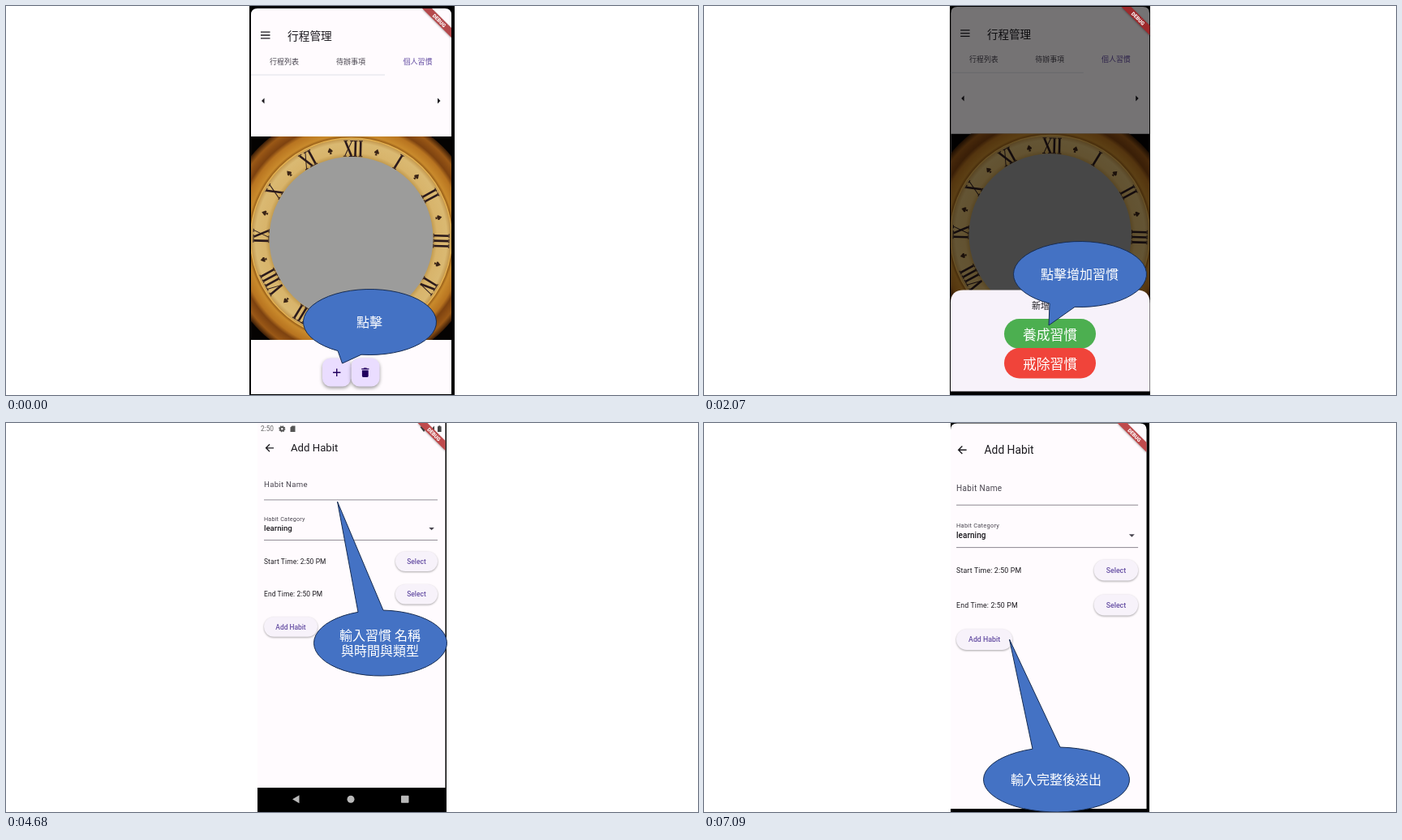
Write an HTML page that moves like this. It is 853 px wide and 480 px high and loops after 8 s.

```html
<!DOCTYPE html>
<html lang="zh-Hant">
<head>
<meta charset="utf-8">
<title>Habit tutorial</title>
<style>
  html, body { margin: 0; width: 100%; height: 100%; overflow: hidden; background: #fff; }
  svg { display: block; width: 853px; height: 480px; }
  text { font-family: Roboto, "Noto Sans CJK TC", "Noto Sans CJK", sans-serif; white-space: pre; }
  .soft { filter: drop-shadow(0 1px 1px #0005); }
  .fab { filter: drop-shadow(0 2px 2px #0006); }
</style>
</head>
<body>
<svg id="stage" viewBox="0 0 853 480"></svg>
<script>
const INK = '#1d1b20', GREY = '#49454f', PURPLE = '#6750a4', PAPER = '#fffbfe', DEEP = '#21005d';

const rect = (x, y, w, h, fill, r = 0, more = '') =>
  `<rect x="${x}" y="${y}" width="${w}" height="${h}" rx="${r}" fill="${fill}" ${more}/>`;
const path = (d, fill, stroke = 'none', width = 1) =>
  `<path d="${d}" fill="${fill}" stroke="${stroke}" stroke-width="${width}"/>`;
const circle = (x, y, r, fill, more = '') => `<circle cx="${x}" cy="${y}" r="${r}" fill="${fill}" ${more}/>`;
const text = (x, y, size, str, fill = INK, more = '') =>
  `<text x="${x}" y="${y}" font-size="${size}" fill="${fill}" ${more}>${str}</text>`;
const MID = 'text-anchor="middle"';
const label = (x, y, size, str, fill, weight = 400) => text(x, y, size, str, fill, `${MID} font-weight="${weight}"`);

// Area with rounded top corners
const topRounded = (x, y, w, h, r, fill) =>
  path(`M${x} ${y + h}V${y + r}q0 ${-r} ${r} ${-r}h${w - 2 * r}q${r} 0 ${r} ${r}V${y + h}Z`, fill);

// Corner ribbon: a and b are the distances of its two edges along the sides
function ribbon(right, top, a, b, fill) {
  const c = (a + b) / 4;
  return `<g class="soft">${path(`M${right - a} ${top}H${right - b}L${right} ${top + b}V${top + a}Z`, fill)}</g>` +
    `<g transform="translate(${right - c} ${top + c}) rotate(45)">${label(0, 2.2, 6.3, 'DEBUG', '#fff', 900)}</g>`;
}

// Elliptical callout whose tail leaves between x1 and x2 and ends at the tip
function bubble(cx, cy, rx, ry, x1, x2, tipX, tipY, lines) {
  const below = tipY > cy;
  const edge = x => cy + (below ? 1 : -1) * ry * Math.sqrt(1 - ((x - cx) / rx) ** 2);
  const d = `M${x1} ${edge(x1)}A${rx} ${ry} 0 1 ${+below} ${x2} ${edge(x2)}L${tipX} ${tipY}Z`;
  return path(d, '#4472c4', '#172c51') + lines.map((line, i) =>
    label(cx - .5, cy + 6 + (i - (lines.length - 1) / 2) * 19, 16, line, '#fff')).join('');
}

// Roman numeral built from thick and thin strokes, centred on the origin
const GLYPHS = {
  I: { w: 6.4, thick: 'M0-9V9', thin: 'M-2.5-9.5h5M-2.5 9.5h5' },
  V: { w: 11, thick: 'M-3.5-9L0 9', thin: 'M0 9L4-9M-6-9.5h5M2-9.5h4' },
  X: { w: 11, thick: 'M-4-9L4 9', thin: 'M4-9L-4 9M-6-9.5h5M2-9.5h4M-6 9.5h4M1 9.5h5' }
};
function numeral(str) {
  const glyphs = [...str].map(c => GLYPHS[c]);
  let x = -glyphs.reduce((sum, g) => sum + g.w, 0) / 2;
  return glyphs.map(g => {
    x += g.w;
    return `<g transform="translate(${x - g.w / 2} 0)">` +
      path(g.thick, 'none', '#2b1a1c', 2.6) + path(g.thin, 'none', '#2b1a1c', 1) + '</g>';
  }).join('');
}

function clock() {
  const marks = 'XII I II III IV V VI VII VIII IX X XI'.split(' ').map((n, i) =>
    `<g transform="rotate(${i * 30 + 1.5}) translate(0 -111)">${numeral(n)}</g>` +
    `<g transform="rotate(${i * 30 + 16.5}) translate(0 -111)">${path('M0-4L3 0Q3 3 0 1Q-3 3-3 0ZM-1.5 4L0 0L1.5 4Z', '#3a2416')}</g>`).join('');
  return `<svg x="302" y="161" width="247" height="251" viewBox="302 161 247 251">` + rect(302, 161, 247, 251, '#050302') +
    `<g transform="translate(425.5 287)">` + circle(0, 0, 160, 'url(#bezel)') +
    circle(0, 0, 124, 'url(#dial)', 'stroke="#e3b050" stroke-width="1.5"') + marks +
    circle(0, 0, 101, '#9c9c9b') + '</g></svg>';
}

const home =
  topRounded(302, 3, 247, 476, 8, PAPER) +
  path('M314 32.2h11.5M314 36h11.5M314 39.8h11.5', 'none', INK, 1.3) +
  text(347, 42, 13.7, '行程管理') +
  label(343, 71.5, 9, '行程列表', GREY) + label(425, 71.5, 9, '待辦事項', GREY) + label(507.5, 71.5, 9, '個人習慣', PURPLE) +
  rect(302, 84.5, 165, 1, '#dfe2ea') +
  path('M318.5 113.5v7l-3.5-3.5ZM532 113.5v7l3.5-3.5Z', INK) +
  clock() +
  [390, 425.5].map(x => rect(x, 434.5, 35, 35, '#eaddff', 10, 'class="fab"')).join('') +
  path('M403 452.3h9.4M407.7 447.6v9.4', 'none', DEEP, 1.4) +
  path('M438.2 447.2h2.4l.7-.8h3l.7.8h2.4v1.4h-9.2ZM438.9 449.4h7.8v7.2q0 1.3-1.3 1.3h-5.2q-1.3 0-1.3-1.3Z', DEEP);

const pill = (x, y, w, str) => rect(x, y, w, 24.5, '#f7f2fa', 12.2, 'class="soft"') +
  label(x + w / 2, y + 15.3, 8.4, str, PURPLE, 500);

const form =
  path('M330 30.8h-9M325 26.3l-4.5 4.5 4.5 4.5', 'none', INK, 1.3) +
  text(351, 35.2, 13.2, 'Add Habit') +
  text(318, 79, 9.6, 'Habit Name', GREY, 'letter-spacing=".3"') +
  rect(318, 94.5, 214, .8, '#79747e') +
  text(318, 121.4, 7.2, 'Habit Category', GREY, 'letter-spacing=".2"') +
  text(318, 133.4, 9.6, 'learning', INK, 'font-weight="500"') +
  path('M521.3 129h6.6l-3.3 3.3Z', GREY) +
  rect(318, 144, 214, .8, '#79747e') +
  text(318, 174, 8.4, 'Start Time: 2:50 PM', INK, 'letter-spacing=".15"') + pill(480, 158.5, 52, 'Select') +
  text(318, 214.3, 8.4, 'End Time: 2:50 PM', INK, 'letter-spacing=".15"') + pill(480, 199, 52, 'Select') +
  pill(318, 239.2, 66, 'Add Habit');

const statusBar =
  text(314, 10.3, 8.3, '2:50', '#666') +
  circle(340.3, 7.2, 2.3, 'none', 'stroke="#555" stroke-width="2"') +
  circle(340.3, 7.2, 3.5, 'none', 'stroke="#555" stroke-width="1.2" stroke-dasharray="1.4 1.35"') +
  path('M352.5 3.5h4v7.5h-6V5.5Z', '#555') +
  path('M510.5 5q4.5-3.5 9 0l-4.5 6ZM521 11l7-7.5V11ZM532 4.2h1.2v-1h2.2v1h1.2V11h-4.6Z', '#444');

const navBar = rect(310, 450, 233, 30, '#000') +
  path('M361.5 459.3v10l-8.5-5Z', '#b9b9b9') + circle(425, 464.2, 4.5, '#b9b9b9') + rect(487, 459.8, 9.5, 9, '#b9b9b9', .8);

const scenes = [
  { start: 0, art: rect(300, 0, 253, 480, '#000') + home + ribbon(549, 3, 36, 24, '#b5494c') +
      bubble(448.5, 390, 82, 40.5, 409, 438, 414.5, 441, ['點擊']) },
  { start: 500, art: rect(303, 0, 247, 480, '#000') +
      `<g transform="translate(5 -2) scale(.991)">${home}</g>` + rect(304, 0, 245.5, 476, '#000', 0, 'opacity=".54"') +
      ribbon(549.5, 1, 35, 23, '#9e2a2c') +
      topRounded(304, 350.5, 245.5, 125, 16, '#f7f2fa') +
      label(426, 374, 11, '新增習慣', INK, 500) +
      rect(370, 386, 113, 37, '#4caf50', 18.5) + rect(370, 422, 113, 37.5, '#f0443a', 18.7) +
      label(426.5, 411.5, 16.8, '養成習慣', '#fff') + label(426.5, 448, 16.8, '戒除習慣', '#fff') +
      bubble(463.5, 331, 82, 40.5, 426, 457, 425, 394, ['點擊增加習慣']) },
  { start: 3110, art: rect(310, 0, 233, 480, '#000') + rect(310, 0, 231.5, 450, PAPER) + statusBar + form + navBar +
      ribbon(541.5, 0, 34, 22, '#bf4a4c') +
      bubble(461.5, 271.5, 82, 40.5, 434, 465, 408.5, 97, ['輸入習慣 名稱', '與時間與類型']) },
  { start: 5720, art: rect(304, 0, 245, 480, '#000') + topRounded(304, .5, 241.5, 475.5, 8, PAPER) +
      `<g transform="translate(-21.9 .6) scale(1.047 1.06)">${form}</g>` + ribbon(545.5, 0, 36, 24, '#bf4a4c') +
      bubble(434.5, 440, 90, 40, 405, 439, 376.5, 267, ['輸入完整後送出']) }
];

const gradient = (id, r, stops) =>
  `<radialGradient id="${id}" gradientUnits="userSpaceOnUse" cx="0" cy="0" r="${r}">` +
  stops.map(([at, color]) => `<stop offset="${at / r}" stop-color="${color}"/>`).join('') + '</radialGradient>';

const stage = document.getElementById('stage');
stage.innerHTML = '<defs>' +
  gradient('bezel', 160, [[124, '#8a5212'], [128, '#c98a2c'], [138, '#b87420'], [143, '#7d4210'], [153, '#9a5816'], [160, '#3a1c06']]) +
  gradient('dial', 124, [[101, '#c39c50'], [106, '#d8b46b'], [118, '#dab972'], [124, '#c1944a']]) +
  '</defs>' + scenes.map(s => `<g class="scene">${s.art}</g>`).join('');
const groups = [...stage.querySelectorAll('.scene')];

function draw(now) {
  const t = now % 8000;
  const current = scenes.filter(s => s.start <= t).length - 1;
  groups.forEach((g, i) => g.style.display = i === current ? '' : 'none');
  requestAnimationFrame(draw);
}
draw(0);
</script>
</body>
</html>
```
